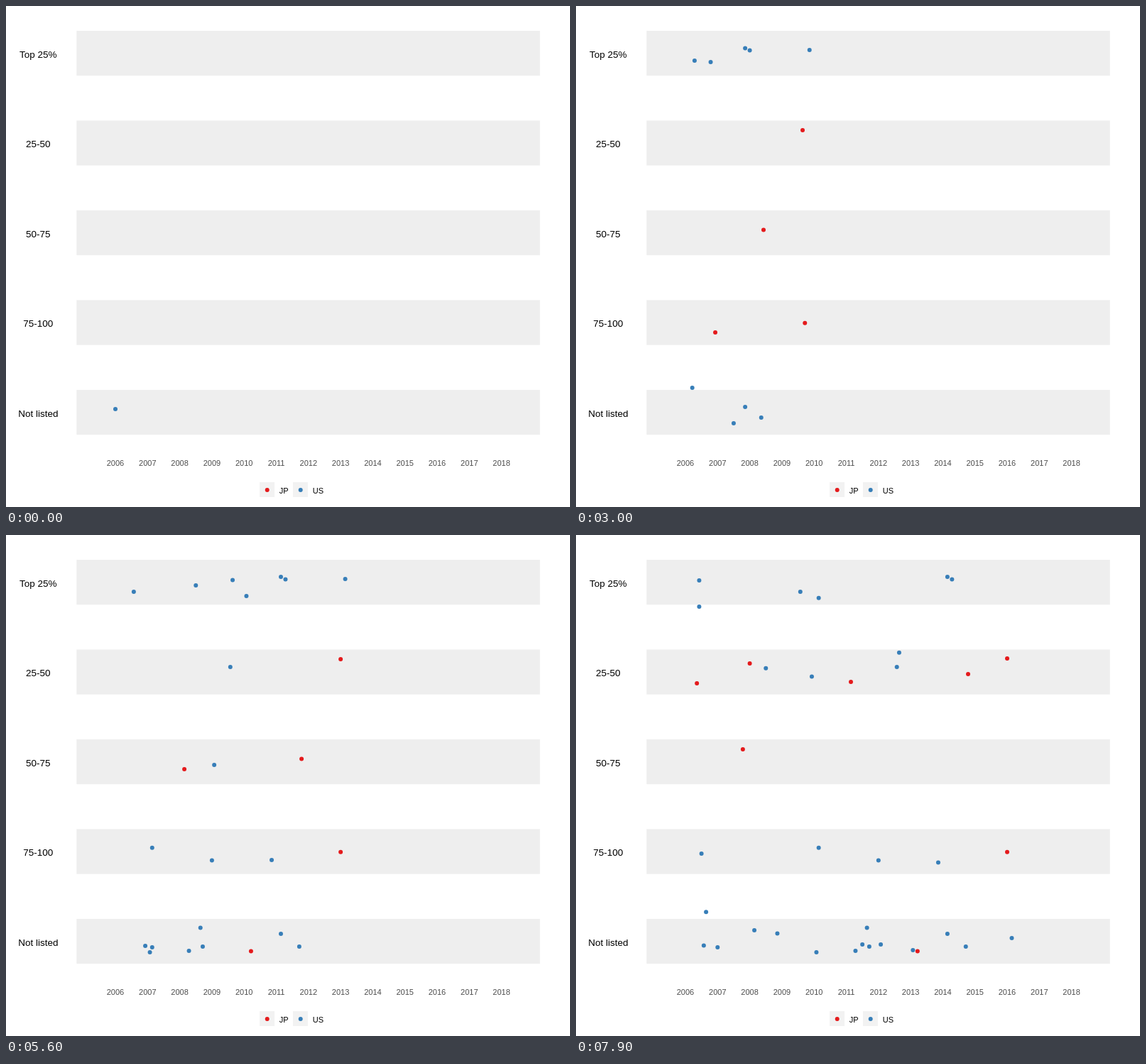
An HTML page that plays this animation: 794 px wide and 706 px high, repeating every 8000 ms.

```html
<!DOCTYPE html>
<html lang="en">
<head>
<meta charset="utf-8">
<title>Yearly rank flow</title>
<style>
  html, body { margin: 0; width: 100%; height: 100%; overflow: hidden; background: #fff; }
  svg { display: block; width: 794px; height: 706px; }
  text { font-family: "Liberation Sans", Arial, sans-serif; font-size: 11px; }
  .band { font-size: 13.5px; text-anchor: middle; }
  .year { fill: #4d4d4d; text-anchor: middle; }
</style>
</head>
<body>
<svg id="stage" viewBox="0 0 794 706"></svg>
<script>
const stage = document.getElementById('stage');
const COLORS = { JP: '#e41a1c', US: '#377eb8' };
const YEAR_W = 45.3, X0 = 154, ROWS = 15, LOOP = 8000;
const bandY = i => 67.6 + 126.5 * i;

// start row, vertical jitter, band held in each year (the last one repeats)
const PATHS = {
  JP: [
    [2, -.3, '3'], [3, -19.2, '11111111101'], [21, -5, '2222222221'],
    [44, 12.9, '334'], [75, 12.9, '2221'], [123, -13, '1'],
    [126, -18.6, '2'], [147, 14.9, '1']
  ],
  US: [
    [0, -5.6, '44400000004'], [22, 6.5, '24'], [28, -5.1, '000000010'],
    [30, -8.6, '4440'], [30, -11.6, '11004'], [35, 14.4, '444423'],
    [46, 11.5, '000004'], [53, -4, '01000001'], [54, -8.1, '4001'],
    [61, 3.5, '222224'], [62, 11.4, '3'], [67, 6.4, '004'],
    [68, -20, '4'], [70, 3.5, '000004'], [73, 12.5, '4'],
    [90, -6.3, '3'], [90, 7.4, '444004'], [91, 14.4, '4'],
    [94, 5.5, '4441'], [99, 12.5, '0'], [110, -12.1, '4'],
    [115, -6.3, '1'], [120, -16.5, '4'], [138, 7.4, '4'],
    [143, -18, '34'], [144, 4.9, '4'], [145, 1.9, '3'],
    [146, -3.6, '0'], [146, -8.1, '01']
  ]
};

function add(tag, attrs, label) {
  const el = document.createElementNS('http://www.w3.org/2000/svg', tag);
  for (const key in attrs) el.setAttribute(key, attrs[key]);
  if (label) el.textContent = label;
  return stage.appendChild(el);
}
const dot = (cx, cy, group) => add('circle', { cx, cy, r: 3, fill: COLORS[group] });

['Top 25%', '25-50', '50-75', '75-100', 'Not listed'].forEach((name, i) => {
  add('rect', { x: 99.3, y: bandY(i) - 32.7, width: 652.4, height: 63.3, fill: '#eee' });
  add('text', { x: 45.3, y: bandY(i) + 5, class: 'band' }, name);
});
for (let i = 0; i < 13; i++)
  add('text', { x: X0 + YEAR_W * i, y: 647.5, class: 'year' }, String(2006 + i));
['JP', 'US'].forEach((group, i) => {
  const x = 357 + 47 * i;
  add('rect', { x, y: 671, width: 21, height: 21, fill: '#f2f2f2' });
  dot(x + 10.7, 682, group);
  add('text', { x: x + 27.7, y: 686.5 }, group);
});

const dots = Object.keys(PATHS).flatMap(group =>
  PATHS[group].map(([start, jitter, bands]) => ({ start, jitter, bands, el: dot(X0, 0, group) })));

// Each year is a sigmoid from one band to the next, sampled at ROWS points.
function place({ start, jitter, bands, el }, row) {
  const r = row - start;
  el.style.display = r < 0 ? 'none' : '';
  if (r < 0) return;
  const year = Math.floor(r / ROWS), part = r % ROWS / (ROWS - 1);
  const yAt = q => bandY(+bands[Math.min(q, bands.length - 1)]);
  const s = 1 / (1 + Math.exp(5 - 10 * part));
  el.setAttribute('cx', X0 + YEAR_W * (year + part));
  el.setAttribute('cy', yAt(year) + (yAt(year + 1) - yAt(year)) * s + jitter);
}

function draw(now) {
  const step = Math.floor(now % LOOP / 100);
  const row = Math.floor(1.924 * step + .06);
  dots.forEach(d => place(d, row));
  requestAnimationFrame(draw);
}
draw(performance.now());
</script>
</body>
</html>
```
